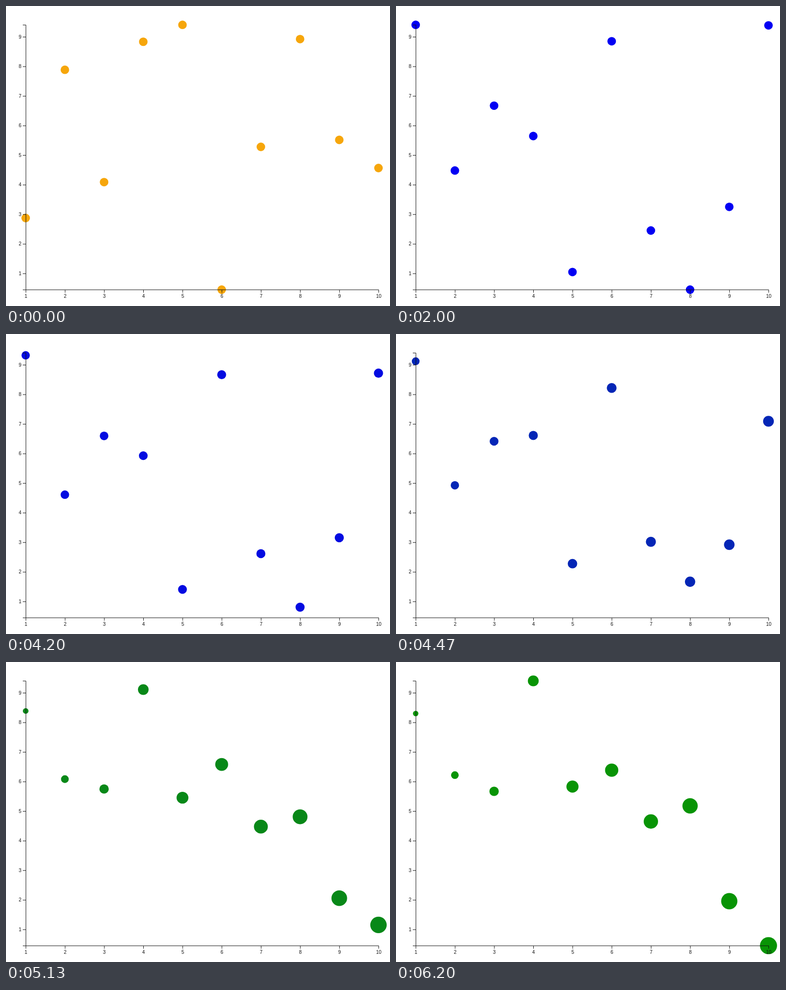
These frames come from a looping animation (800x624 px, 8.14 s). An HTML page with a canvas:

```html
<!DOCTYPE html>
<html lang="en">
<head>
<meta charset="utf-8">
<title>Scatter plot transitions</title>
<style>
  html, body { margin: 0; width: 100%; height: 100%; overflow: hidden; background: #fff; }
  canvas { display: block; }
</style>
</head>
<body>
<canvas id="plot" width="800" height="624"></canvas>
<script>
const ctx = document.getElementById('plot').getContext('2d');
const LOOP = 8140;
const LEFT = 41, RIGHT = 776, TOP = 39.2, BOTTOM = 590;
const STEP_X = (RIGHT - LEFT) / 9;
const STEP_Y = 61.53;

const symbolRadius = area => Math.sqrt(area / Math.PI);
const fixedRadius = () => symbolRadius(250);
const growingRadius = n => symbolRadius(100 * n);

const states = [
  { y: [441, 132.7, 366.3, 74.4, 39.2, 590, 293, 68.8, 278.5, 337],
    color: [246, 166, 11], radius: fixedRadius },
  { y: [39.2, 342.2, 207.3, 270.5, 553.3, 73.3, 467, 590, 417.8, 40.3],
    color: [3, 0, 243], radius: fixedRadius },
  { y: [107.2, 235.3, 269, 39.2, 259.2, 225, 331.8, 299.2, 497.5, 590],
    color: [8, 148, 5], radius: growingRadius }
];
const transitions = [
  { start: 670, duration: 250 },
  { start: 3670, duration: 2000 }
];

const lerp = (a, b, k) => a + (b - a) * k;
const cubicInOut = t => t < 0.5 ? 4 * t ** 3 : 1 - 4 * (1 - t) ** 3;

function drawDots(time) {
  const index = time < transitions[1].start ? 0 : 1;
  const { start, duration } = transitions[index];
  const k = cubicInOut(Math.min(1, Math.max(0, (time - start) / duration)));
  const from = states[index], to = states[index + 1];

  const rgb = from.color.map((c, i) => Math.round(lerp(c, to.color[i], k)));
  ctx.fillStyle = `rgb(${rgb})`;
  from.y.forEach((y, i) => {
    const r = lerp(from.radius(i + 1), to.radius(i + 1), k);
    ctx.beginPath();
    ctx.arc(LEFT + i * STEP_X, lerp(y, to.y[i], k), r, 0, 2 * Math.PI);
    ctx.fill();
  });
}

function drawAxes() {
  const x0 = LEFT + 0.5, x1 = RIGHT + 0.5;
  const y0 = TOP + 0.3, y1 = BOTTOM + 0.3;
  ctx.strokeStyle = ctx.fillStyle = '#111';
  ctx.lineWidth = 1;
  ctx.font = '10px "Liberation Sans", Arial, sans-serif';
  ctx.beginPath();
  ctx.moveTo(x0 - 6.5, y0);
  ctx.lineTo(x0, y0);
  ctx.lineTo(x0, y1);
  ctx.lineTo(x0 - 6.5, y1);
  ctx.moveTo(x0, y1);
  ctx.lineTo(x1, y1);

  ctx.textAlign = 'center';
  for (let n = 1; n <= 10; n++) {
    const x = x0 + (n - 1) * STEP_X;
    ctx.moveTo(x, y1);
    ctx.lineTo(x, y1 + 6);
    ctx.fillText(n, x, BOTTOM + 16.6);
  }
  ctx.textAlign = 'right';
  for (let n = 1; n <= 9; n++) {
    const y = 64.5 + (9 - n) * STEP_Y;
    ctx.moveTo(x0 - 6.5, y);
    ctx.lineTo(x0, y);
    ctx.fillText(n, x0 - 9.5, y + 3.2);
  }
  ctx.stroke();
}

const origin = performance.now();
function frame() {
  ctx.fillStyle = '#fff';
  ctx.fillRect(0, 0, 800, 624);
  drawDots((performance.now() - origin) % LOOP);
  drawAxes();
  requestAnimationFrame(frame);
}
frame();
</script>
</body>
</html>
```
